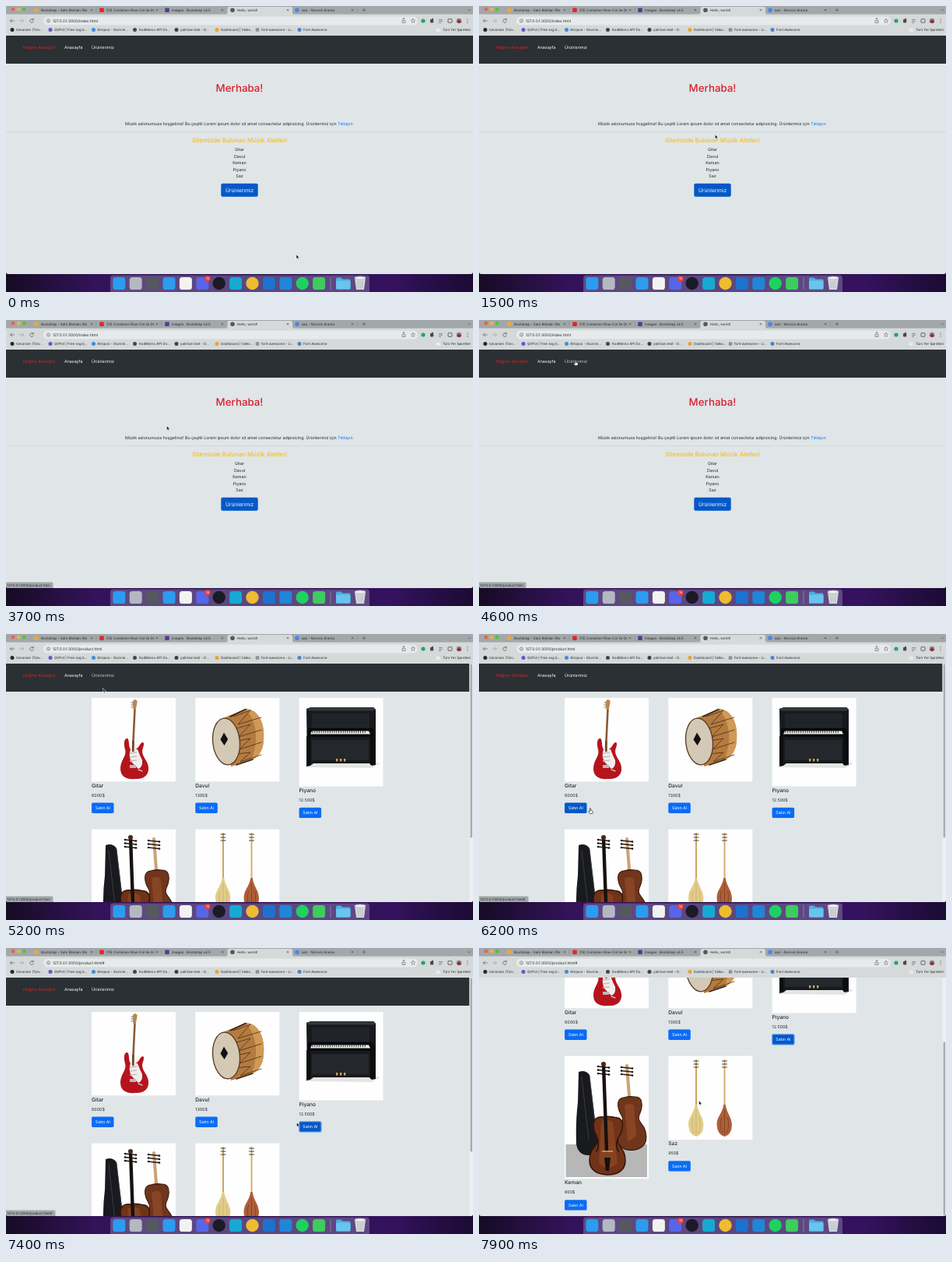
Write an HTML page that moves like this. It is 600 by 367 pixels and loops after 8 s.

```html
<!DOCTYPE html>
<html lang="tr">
<head>
<meta charset="utf-8">
<title>Hello, world!</title>
<style>
  html, body { margin: 0; width: 100%; height: 100%; overflow: hidden; background: #170b28; }
  svg { display: block; width: 600px; height: 367px; }
  text { font-family: Inter, "Open Sans", sans-serif; text-rendering: geometricPrecision; white-space: pre; }
</style>
</head>
<body>
<svg id="stage" viewBox="0 0 600 367"></svg>
<script>
const INK = '#24282b', BLUE = '#0a6cf5', BLUE_DARK = '#0558c8';

const rect = (x, y, w, h, fill, more = '') =>
  `<rect x="${x}" y="${y}" width="${w}" height="${h}" fill="${fill}" ${more}/>`;
const disc = (x, y, r, fill, more = '') =>
  `<circle cx="${x}" cy="${y}" r="${r}" fill="${fill}" ${more}/>`;
const path = (d, fill, more = '') => `<path d="${d}" fill="${fill}" ${more}/>`;
const line = (d, color = '#55595c', width = .7) =>
  path(d, 'none', `stroke="${color}" stroke-width="${width}" stroke-linecap="round" stroke-linejoin="round"`);
// y is the vertical middle of the letters
const text = (x, y, str, size = 5.33, fill = INK, more = '') =>
  `<text x="${x}" y="${y + size * .36}" font-size="${size}" fill="${fill}" ${more}>${str}</text>`;
const centered = 'text-anchor="middle"';

function tabStrip() {
  const tabs = [
    [39, '#f0a63a', 'Bootstrap - Satır Blokları (Ro'],
    [123, '#e5242a', '(15) Container-Row-Col ile Gr'],
    [207, '#5b3a94', 'Images · Bootstrap v4.5'],
    [291, '#55595c', 'Hello, world!'],
    [374, '#4b87e8', 'saz - Norvoz Arama']
  ];
  const lights = ['#ee5f57', '#e9b83d', '#55c043'].map((c, i) => disc(9 + i * 7.2, 4.2, 2.4, c)).join('');
  const active = path('M282 11Q284.500 11 284.500 8V3.500Q284.500 1 287 1H365.500Q368 1 368 3.500V8Q368 11 370.500 11Z', '#d5d9da');
  const items = tabs.map(([x, color, label], i) => {
    const icon = i === 1 || i === 2
      ? rect(x - 2.8, 2.4, 5.6, 5.6, color, 'rx="1"')
      : disc(x, 5.2, 2.8, color);
    const end = x + 71;
    const cross = line(`M${end - 1} 4.200l2 2m0-2l-2 2`, '#35393b', .55);
    const rule = i === 2 || i === 3 ? '' : line(`M${x + 77} 3v4.500`, '#777d80', .4);
    return icon + text(x + 6, 5.2, label, 4.45) + cross + rule;
  }).join('');
  return rect(0, 0, 600, 12, '#a2a8aa') + lights + active + items +
    line('M458 5.200h4m-2-2v4') + line('M593.500 4.500l1.700 1.700 1.700-1.700');
}

function toolbar() {
  return rect(0, 10.6, 600, 27.4, '#d5d9da') +
    line('M10.500 19h-5m2-2l-2 2 2 2') + line('M17.500 19h5m-2-2l2 2-2 2', '#9a9fa1') +
    line('M35 17.500a2.400 2.400 0 1 0 .4 2.500m-.2-3.800v1.700h-1.700') +
    rect(48, 13.4, 481, 11.2, '#e6eaeb', 'rx="5.6"') +
    `<circle cx="54.500" cy="19" r="2.100" fill="none" stroke="#55595c" stroke-width=".6"/>` + line('M54.500 18.900v1', '#55595c', .6) +
    text(60, 19, '', 4.9, INK, 'id="url"') +
    line('M509.500 18.500h-.500v3h4v-3h-.500m-1.500 1v-4m-1.200 1.200l1.200-1.200 1.200 1.200', '#55595c', .6) +
    line('M523 16.300l.8 1.700 1.900.2-1.400 1.300.4 1.900-1.700-1-1.700 1 .4-1.900-1.400-1.300 1.900-.2Z', '#55595c', .5) +
    disc(536, 19, 2.6, '#23a566') + rect(545, 17, 4.2, 4.4, '#44494c', 'rx=".8"') + disc(548, 16.8, 1, '#44494c') +
    line('M556.500 17.500h4m-4 2h4m-4 2h2', '#55595c', .6) +
    rect(568, 16.7, 5, 4.6, 'none', 'stroke="#44494c" stroke-width=".8" rx=".6"') +
    disc(582, 19, 3.3, '#8b8f93') + path('M579 20.500l3-3.500 3.200 3.500-2.700 1.800Z', '#9b2530') +
    [16.8, 19, 21.2].map(y => disc(593, y, .55, '#44494c')).join('');
}

function bookmarks() {
  const marks = [
    [8, 13, '#25292c', 'tolvarsen (Tolv...'],
    [57, 62, '#6a55c8', 'QVPot | Free svg b...'],
    [112.5, 117, '#3b8ee0', 'Atropos - Stunnin...'],
    [165.5, 171, '#41474b', 'KodMemo API Do...'],
    [219, 224, '#3d4144', 'yatirlam.test - D...'],
    [271, 276, '#eda02f', 'Dashboard | Valko...'],
    [323, 328, '#8d9396', 'font-awesome - Li...'],
    [377, 382, '#4e80cd', 'Font Awesome']
  ];
  return marks.map(([ix, tx, color, label]) =>
      disc(ix, 30.5, 2.5, color) + text(tx, 30.5, label, 4.4)).join('') +
    path('M552.500 28.500h2l.8.8h2.700v3.700h-5.500Z', '#e8ebec') + text(561, 30.5, 'Tüm Yer İşaretleri', 4.4);
}

const nav = (width, id) =>
  rect(0, 38, width, 36, '#2a3033') +
  text(22, 53, 'Nağme Konağım', 5.33, '#d3232b') +
  text(75, 53, 'Anasayfa', 5.33, '#fff') +
  text(110, 53, 'Ürünlerimiz', 5.33, '#fff', `id="${id}"`);

function homePage() {
  const list = ['Gitar', 'Davul', 'Keman', 'Piyano', 'Saz'];
  return rect(0, 38, 600, 306, '#e0e5e8') + nav(600, 'homeLink') +
    text(300, 105.5, 'Merhaba!', 13.3, '#d9202c', centered + ' font-weight="500"') +
    text(300, 151.5, 'Müzik salonumuza hoşgeliniz! Bu çeşitli Lorem ipsum dolor sit amet consectetur adipisicing. Ürünlerimiz için <tspan fill="#0a78f5">Tıklayın.</tspan>', 5.33, INK, centered) +
    rect(0, 161, 600, .6, '#c9ced1') +
    text(300, 172, 'Sitemizde Bulunan Müzik Aletleri', 7.8, '#fbbd16', centered + ' font-weight="500"') +
    list.map((name, i) => text(300, 184.2 + i * 8.5, name, 5.33, INK, centered)).join('') +
    rect(276.3, 227.8, 47.4, 17, BLUE_DARK, 'rx="2"') +
    text(300, 236.3, 'Ürünlerimiz', 6.67, '#fff', centered);
}

const pegs = (x, y, color) => [0, 4.5, 9].map(d =>
  line(`M${x - 7} ${y + d}l14 1.500`, color, 1.3) + disc(x - 7, y + d, 1.3, color) + disc(x + 7, y + d + 1.5, 1.3, color)).join('');

function guitar() {
  return line('M165.500 96L163 148', '#8a5a34', 2.6) +
    path('M163.500 97l-.7-6q-1-6 3-7 3.500 1 2.700 4l-1.800 9Z', '#b98550') +
    [88, 91, 94].map(y => line(`M161 ${y}h1.500`, '#777', 1)).join('') +
    path('M156 134C150 134 152 145 153.500 150 154 158 147 162 147 173 147 184 157 187 165 186 178 187 184 180 183 171 182 162 175 158 175 150 176 145 178.500 141 176 139 172 139 171 147 166 148L160 148C157 144 159 136 156 134Z', '#b5141d') +
    path('M160 148l9 0q3 8 6 14 1 9-5 11l-9-9q-4-8-1-16Z', '#f0eeec') +
    line('M163.300 138V150', '#6e4529', 2.6) +
    [153, 158, 163].map(y => line(`M159.500 ${y}l8-1`, '#c3bfbc', 1.5)).join('') +
    rect(159, 168, 8, 4, '#bdb9b6') + line('M170 174l5 2', '#eee', 1.2);
}

function drum() {
  const bands = [0, 1, 2, 3].map(i => {
    const y = 106 + i * 16;
    return line(`M${292 + i} ${y}L314 ${y - 8 + i * 2}L${298 + i} ${y + 10}L328 ${y + 1}`, '#4b2e19', .8);
  }).join('');
  return path('M279 108L308 96C326 97 333 117 331 137 330 151 323 159 315 162L289 170Z', '#b47b40') +
    path('M308 96C326 97 333 117 331 137 330 151 323 159 315 162 325 140 323 112 308 96Z', '#d09956') +
    bands + line('M288 106L308 96.500M296 168L317 161', '#35231a', 1.5) +
    `<ellipse cx="283" cy="138" rx="17.300" ry="30" fill="#d3c9b4" stroke="#54381f" stroke-width="1.300" transform="rotate(-6 283 138)"/>` +
    path('M280 126.500l5.200 8.500-4.700 8-5-7.500Z', '#111');
}

function piano() {
  const keys = Array.from({ length: 25 }, (_, i) => line(`M${394 + i * 2.8} 124.800v2`, '#15171a', .9)).join('');
  return path('M384 171L391 165 470 163 481 166 470 172Z', '#e4e4e4') +
    path('M386 96l6-2 80 0 3 3v71l-5 1-3-3h-72l-4 3h-4Z', '#17191c') +
    path('M386 96l6-2 80 0 3 3-3 1.500h-84Z', '#33373b') +
    rect(393, 102, 74, 18, '#202327') +
    path('M388 121l83 0 3 7v4l-87 0Z', '#08090b') +
    path('M393 124.500h73l2 4h-77Z', '#f1efe9') + keys +
    rect(393, 136, 73, 26, '#24272b') +
    path('M386 131h5v38l-5 1Z', '#0c0d0f') + path('M468 131h6v36l-6 1Z', '#0c0d0f') +
    [424, 429, 434].map(x => rect(x, 160, 2.3, 3.5, '#c7a65b')).join('');
}

const violinBody = 'M-8-54C-18-54-20-47-18-38-17-31-11-28-13-22-15-15-23-13-23 2-23 14-13 20 0 20 13 20 23 14 23 2 23-13 15-15 13-22 11-28 17-31 18-38 20-47 18-54 8-54 3-55-3-55-8-54Z';

function violins() {
  return rect(111.5, 364, 104.5, 42, '#b7b7b8') +
    path('M128 271q9-3 14 4l10 82q2 18-10 21-14 1-17-14-1-30 2-54Z', '#191a1e') +
    line('M132 278l9 80M142 276l8 70', '#43454a', .8) +
    line('M190 263L194 315', '#caa375', 4) + pegs(190, 265, '#2a1a13') +
    path(violinBody, '#70351b', 'transform="translate(196 353) rotate(-3) scale(.82 .92)" stroke="#32170d" stroke-width="1.200"') +
    path('M187 314q8-5 12 1l3 38-11 8Z', '#94512b', 'opacity=".6"') +
    path(violinBody, '#713217', 'transform="translate(165 383) rotate(1)" stroke="#321509" stroke-width="1.500"') +
    path('M157 334q9-4 15 2l6 52q-13 12-24 0Z', '#96502a', 'opacity=".55"') +
    line('M160 262L164 372', '#17110f', 4.4) + disc(160, 261, 3, '#4a2815') + pegs(160, 264, '#1d1411') +
    path('M161 381h8l-2 17h-4Z', '#15110f') + rect(158, 372, 14, 1.6, '#d1a066') +
    line('M152 358q3 7-1 15M178 358q-3 7 1 15', '#170b07', 1.2);
}

const saz = (x, body, neck, shade) =>
  line(`M${x} 256V320`, neck, 2) +
  [257, 261, 265].map(y => line(`M${x - 3} ${y}h6`, '#3b2a20', .9)).join('') +
  path(`M${x - 1.2} 313C${x - 3} 325 ${x - 10} 328 ${x - 10} 339Q${x - 9} 352 ${x} 354 ${x + 9} 352 ${x + 9.500} 339C${x + 9} 328 ${x + 3} 325 ${x + 1.200} 313Z`, body) +
  line(`M${x} 320v31M${x - 4} 330q-3 9 1 19M${x + 4} 330q3 9-1 19`, shade, .7);

const products = [
  { id: 'gitar', name: 'Gitar', price: '6000$', x: 110, y: 82, h: 107.3, art: guitar },
  { id: 'davul', name: 'Davul', price: '1300$', x: 243.3, y: 82, h: 107.3, art: drum },
  { id: 'piyano', name: 'Piyano', price: '12.500$', x: 376.6, y: 82, h: 113.5, art: piano },
  { id: 'keman', name: 'Keman', price: '800$', x: 110, y: 250.5, h: 157.5, art: violins },
  { id: 'saz', name: 'Saz', price: '950$', x: 243.3, y: 250.5, h: 107.5,
    art: () => saz(279, '#e2cc8a', '#c9a564', '#c6a863') + saz(315.5, '#ad5f39', '#d3ad72', '#743a22') }
];

const card = ({ id, name, price, x, y, h, art }) => {
  const end = y + h;
  return rect(x, y, 108, h, '#fefefe') + art() +
    text(x, end + 5, name, 6.67, INK, 'font-weight="500"') +
    text(x, end + 17.3, price) +
    rect(x, end + 27.2, 28.5, 13.4, BLUE, `rx="1.700" id="${id}"`) +
    text(x + 14.25, end + 33.9, 'Satın Al', 5.33, '#fff', centered);
};

const shopPage = () =>
  rect(0, 38, 600, 306, '#e0e5e8') +
  `<g id="scroller">${nav(595.5, 'shopLink')}${products.map(card).join('')}</g>` +
  rect(595.5, 38, 4.5, 306, '#eef0f1') + rect(596.5, 38.5, 2.6, 223, '#a9adb0', 'rx="1.300" id="thumb"');

function dock() {
  const icons = ['#2b9cf0', '#b4b8c0', '#55595f', '#2d9bee', '#f2f2f2', '#5865e8', '#1c1a26',
    '#17a9d3', '#eebb31', '#1d72cf', '#2186d8', '#1fd160', '#3fcb5f'];
  const round = [6, 8, 11];
  return rect(0, 338, 600, 29, 'url(#desk)') +
    rect(134, 345.6, 333, 24, '#7a6a9c', 'rx="4" opacity=".62"') +
    icons.map((c, i) => {
      const x = 145.3 + i * 21.4;
      return round.includes(i) ? disc(x, 356, 8.2, c) : rect(x - 8, 348, 16, 16, c, 'rx="3.600"');
    }).join('') +
    disc(259, 350, 3.7, '#ec3e3a') + text(259, 350, '14', 4, '#fff', centered) +
    rect(416.7, 348, .6, 16, '#a89bc0') +
    path('M424 350q0-1.500 1.500-1.500h5l2 2h8.500q1.500 0 1.500 1.500v10q0 1.500-1.500 1.500h-15.500q-1.500 0-1.500-1.500Z', '#4aaee0') +
    rect(424, 352.5, 18.5, 11, '#68c4ee', 'rx="1.500"') +
    path('M448 349h14l-2 15h-10Z', '#d3d6da') +
    `<ellipse cx="455" cy="349" rx="7.200" ry="2" fill="#f0f1f3" stroke="#a4a7ad" stroke-width=".6"/>` +
    line('M452 353l.6 9M455 353v9M458 353l-.6 9', '#aaadb4', .6);
}

const cursors =
  `<g id="arrow">${path('M0 0V5.300L1.300 4.200 2.200 6.200 3.100 5.800 2.200 3.900H3.900Z', '#0b0b0b', 'stroke="#fff" stroke-width=".5"')}</g>` +
  `<g id="hand">${path('M-.7-2.600q.8-.8 1.400 0V0l2 .5q.7.300.6 1.200L2.700 4H-.7L-2.400 1.500q0-1 1-.5l.7.600Z', '#fff', 'stroke="#111" stroke-width=".6"')}</g>`;

const stage = document.getElementById('stage');
stage.innerHTML =
  `<defs>
    <linearGradient id="desk"><stop offset="0" stop-color="#160b24"/><stop offset=".2" stop-color="#35135c"/>
      <stop offset=".5" stop-color="#2a1152"/><stop offset=".82" stop-color="#35125f"/><stop offset="1" stop-color="#1b0b33"/></linearGradient>
    <clipPath id="view"><path d="M0 38H600V341Q600 344 597 344H3Q0 344 0 341Z"/></clipPath>
  </defs>` + dock() +
  `<g clip-path="url(#view)"><g id="home">${homePage()}</g><g id="shop">${shopPage()}</g>
    <g id="status">${rect(-2, 336.5, 65, 9, '#a1a7aa', 'rx="1.500" id="bubble"')}${text(1.5, 340.3, '', 4.25, INK, 'id="hint"')}</g></g>` +
  tabStrip() + toolbar() + bookmarks() + cursors;

const $ = id => document.getElementById(id);
const show = (id, on) => $(id).setAttribute('visibility', on ? 'visible' : 'hidden');

// time, x, y of the pointer
const track = [
  [0, 373, 319], [400, 373, 319], [1100, 308, 180], [1500, 303.300, 165], [2100, 306, 170],
  [2600, 350, 168], [3100, 432, 156], [3200, 436, 152], [3400, 400, 149], [3700, 206.500, 136],
  [4200, 124, 55], [4900, 124, 54], [5200, 124.500, 69.500], [5700, 124, 222], [6200, 143, 226.500],
  [6500, 143, 226], [6800, 257, 224], [7100, 390, 230], [7200, 390, 230], [7400, 373.500, 224],
  [7600, 320, 210], [7900, 282.500, 196]
];
const scrollTrack = [[0, 0], [7500, 0], [7600, 14], [7700, 62], [7800, 100], [7900, 112]];
const pressable = [[3200, 3300], [4200, 5000], [5700, 6500], [6800, 6800], [7100, 7200]];

function sample(rows, t) {
  const i = rows.findIndex(row => row[0] > t);
  if (i < 0) return rows[rows.length - 1].slice(1);
  const a = rows[i - 1], b = rows[i], k = (t - a[0]) / (b[0] - a[0]);
  return a.slice(1).map((v, n) => v + (b[n + 1] - v) * k);
}

function draw(t) {
  const between = (a, b) => t >= a && t <= b;
  const inShop = t >= 5000;
  show('home', !inShop);
  show('shop', inShop);
  $('url').textContent = '127.0.0.1:3000/' + (!inShop ? 'index.html' : t < 7200 ? 'product.html' : 'product.html#');

  show('status', between(3200, 7500));
  const onButton = t >= 5700;
  $('hint').textContent = '127.0.0.1:3000/product.html' + (onButton ? '#' : '');
  $('bubble').setAttribute('width', onButton ? 65.5 : 62.5);

  $('homeLink').setAttribute('fill', between(4200, 4900) ? '#c5cace' : '#fff');
  $('shopLink').setAttribute('fill', between(5000, 5200) ? '#c5cace' : '#fff');

  const focused = t >= 7200;
  $('gitar').setAttribute('fill', between(5700, 6500) ? BLUE_DARK : BLUE);
  $('davul').setAttribute('fill', t === 6800 ? BLUE_DARK : BLUE);
  $('piyano').setAttribute('fill', t >= 7100 ? BLUE_DARK : BLUE);
  $('piyano').setAttribute('stroke', focused ? '#75aef2' : 'none');
  $('piyano').setAttribute('stroke-width', 1.3);

  const [top] = sample(scrollTrack, t);
  $('scroller').setAttribute('transform', `translate(0 ${-top})`);
  $('thumb').setAttribute('y', 38.5 + top * 306 / 418);

  const [x, y] = sample(track, t);
  const hand = pressable.some(([a, b]) => between(a, b));
  show('arrow', !hand);
  show('hand', hand);
  $(hand ? 'hand' : 'arrow').setAttribute('transform', `translate(${x} ${y})`);
}

function tick() {
  draw(Math.floor(performance.now() % 8000 / 100) * 100);
  requestAnimationFrame(tick);
}
tick();
</script>
</body>
</html>
```
